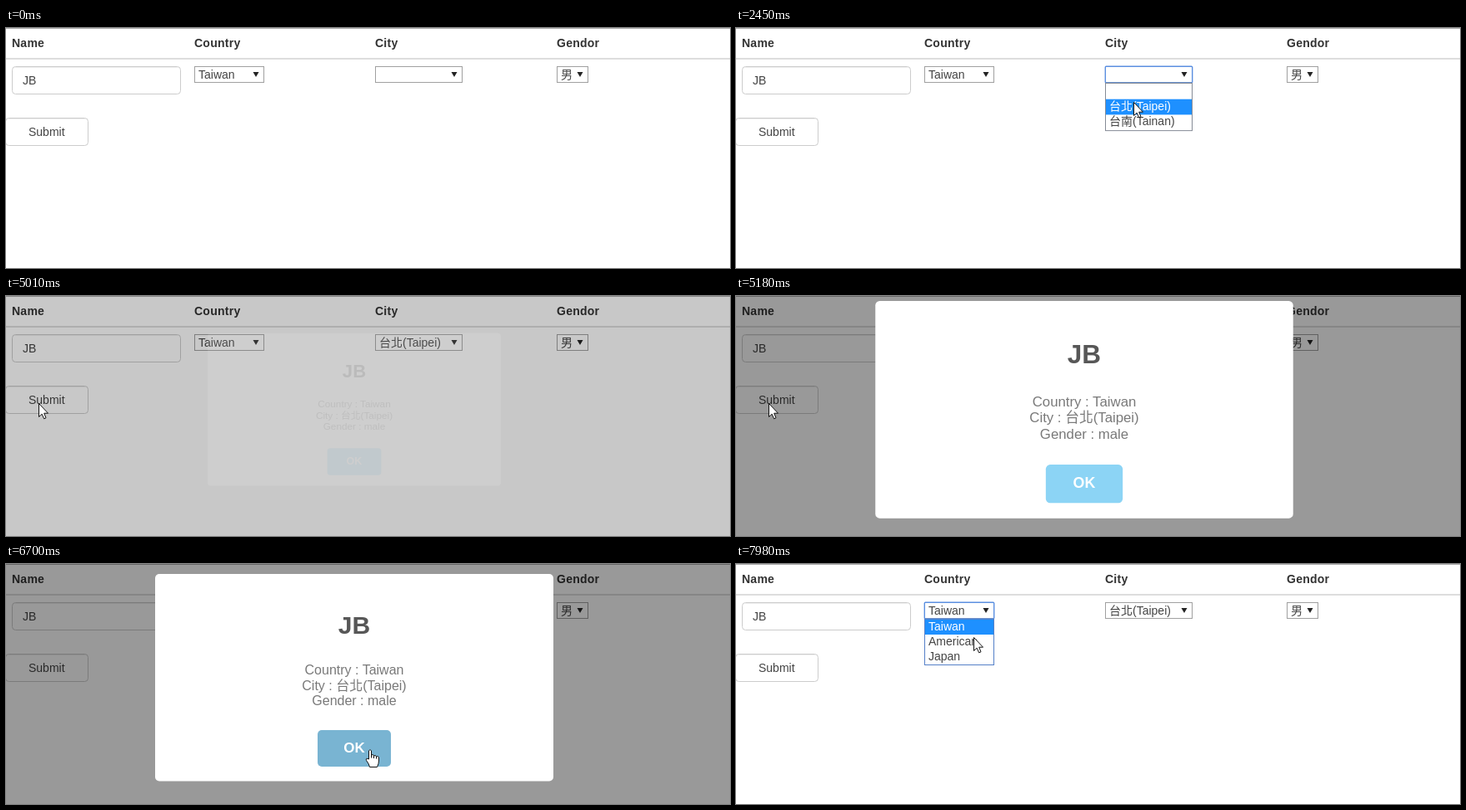
These frames come from a looping animation (869x289 px, 8 s). An HTML page:

```html
<!DOCTYPE html>
<html>
<head>
<meta charset="utf-8">
<style>
html, body { margin: 0; width: 100%; height: 100%; overflow: hidden; background: #fff; }
svg { display: block; width: 869px; height: 289px; }
text { font: 300 14px "Liberation Sans", "Noto Sans CJK TC", "Noto Sans CJK", sans-serif; fill: #444; }
.head text { font-weight: 700; fill: #333; letter-spacing: .25px; }
.field { fill: #fff; stroke: #ccc; }
.select { fill: #fff; stroke: #a0a0a0; }
.focus { fill: none; stroke: #5b8fe0; stroke-width: 1.4; }
.glow { stroke: #66afe9; filter: drop-shadow(0 0 3px rgba(102,175,233,.5)); }
#modal text { text-anchor: middle; font-size: 16px; fill: #797979; }
#modal .title { font-size: 30px; font-weight: 700; fill: #575757; }
#modal .ok { font-size: 17px; font-weight: 700; fill: #fff; }
.cursor { fill: #fff; stroke: #111; stroke-linejoin: round; }
</style>
</head>
<body>
<svg viewBox="0 0 869 289">
  <path d="M0 .5H869" stroke="#aaa"/>
  <path d="M0 37H869" stroke="#ddd" stroke-width="2"/>
  <g class="head">
    <text x="7" y="23">Name</text><text x="226" y="23">Country</text>
    <text x="443" y="23">City</text><text x="661" y="23">Gendor</text>
  </g>
  <rect class="field" x="7.5" y="46.5" width="202" height="33" rx="4"/>
  <text x="20" y="68">JB</text>
  <rect class="field" id="submit" x="-.5" y="108.5" width="99" height="33" rx="4"/>
  <path d="M10 47.5H207M2 109.5H96" stroke="#eee"/>
  <text x="27" y="130">Submit</text>
  <g id="selects"></g>
  <g id="lists"></g>
  <rect id="shade" width="869" height="289"/>
  <g id="modal">
    <rect x="179" y="12" width="478" height="249.5" rx="5" fill="#fff"/>
    <text class="title" x="418" y="84">JB</text>
    <text x="418" y="133">Country : Taiwan</text>
    <text x="418" y="151.5">City : 台北(Taipei)</text>
    <text x="418" y="170">Gender : male</text>
    <rect id="ok" x="374" y="200" width="88" height="44" rx="5"/>
    <text class="ok" x="418" y="227">OK</text>
  </g>
  <g id="cursor">
    <path id="arrow" class="cursor" d="M.5 .5V16.5L4.2 13.2 6.6 18.8 9 17.8 6.7 12.2H11.5Z"/>
    <g id="hand" transform="translate(2 1)">
      <path class="cursor" d="M-1.5 12V2Q0-1 1.5 2V7Q4 5.5 4.5 8 7 6.5 7.5 9 10.5 7.5 10.5 11V14Q10.5 17 8.5 21.5H-.5Q-1 18-4.5 13.5-5.5 10-1.5 12Z"/>
      <path class="cursor" d="M1.5 7V10.5M4.5 8V11M7.5 9V11.5"/>
    </g>
  </g>
</svg>
<script>
const $ = id => document.getElementById(id);
const show = (el, on) => { el.style.display = on ? '' : 'none'; };
const clamp = v => Math.max(0, Math.min(1, v));
const ease = v => v * v * (3 - 2 * v);
const progress = (t, from, to) => clamp((t - from) / (to - from));

function addSelect(id, x, w, label) {
  $('selects').innerHTML += `<rect class="select" x="${x + .5}" y="46.5" width="${w - 1}" height="19"/>
    <text id="${id}" x="${x + 5}" y="61">${label}</text>
    <path d="M${x + w - 13.5} 53h7l-3.5 6z" fill="#222"/>
    <rect class="focus" id="${id}Focus" x="${x + .3}" y="46.3" width="${w - .6}" height="19.6" rx="1"/>`;
}

function addList(id, x, w, row, color, items, picked) {
  const line = (s, i) => `<text x="${x + 5}" y="${80 + i * row}"
    ${i === picked ? 'style="fill:#fff"' : ''}>${s}</text>`;
  $('lists').innerHTML += `<g id="${id}List">
    <rect x="${x + .5}" y="66.5" width="${w - 1}" height="${row * items.length + 1}" fill="#fff" stroke="${color}"/>
    <rect x="${x + 1}" y="${67 + picked * row}" width="${w - 2}" height="${row}" fill="#1e90ff"/>
    ${items.map(line).join('')}</g>`;
}

addSelect('country', 226, 84, 'Taiwan');
addSelect('city', 443, 105, '');
addSelect('gender', 661, 38, '男');
addList('country', 226, 84, 18, '#5580c8', ['Taiwan', 'American', 'Japan'], 0);
addList('city', 443, 105, 18.7, '#858b96', ['', '台北(Taipei)', '台南(Tainan)'], 1);

const spot = {
  below: [610, 262], gender: [694, 55], left: [199, 24], country: [284, 56], city: [466, 62],
  taipei: [477, 89], submit: [39, 129], ok: [435, 222], middle: [390, 155], american: [285, 88]
};
// Each trip: start, end, destination; the pointer rests in between
const trips = [
  [70, 300, 'gender'], [300, 600, 'left'], [600, 770, 'country'], [920, 1690, 'city'],
  [1850, 2450, 'taipei'], [2710, 3160, 'gender'], [3360, 3930, 'submit'], [5260, 5830, 'ok'],
  [6840, 6950, 'middle'], [7050, 7420, 'country'], [7650, 7970, 'american']
];

function pointer(t) {
  let at = spot.below;
  for (const [from, to, name] of trips) {
    const k = ease(progress(t, from, to));
    at = at.map((v, i) => v + (spot[name][i] - v) * k);
  }
  return at.map(Math.round);
}

// The dialog springs in as a damped wave and shrinks away on closing
function dialogScale(t) {
  const u = Math.max(0, t - 5000);
  return 1 - .3 * Math.exp(-u / 100) * Math.cos(Math.PI * u / 180) - .5 * progress(t, 6840, 6940);
}

function draw(t) {
  const within = (a, b) => t >= a && t < b;
  const open = 1 - progress(t, 6840, 6940);

  $('city').textContent = t >= 2710 ? '台北(Taipei)' : '';
  show($('cityFocus'), within(1850, 4930));
  show($('countryFocus'), t >= 7650);
  show($('genderFocus'), false);
  show($('cityList'), within(1850, 2710));
  show($('countryList'), t >= 7720);
  $('submit').classList.toggle('glow', within(6850, 7650));

  $('shade').style.opacity = .4 * progress(t, 4930, 5080) * open;
  $('modal').style.opacity = progress(t, 5000, 5100) * open;
  $('modal').setAttribute('transform', `translate(418 136.5) scale(${dialogScale(t)}) translate(-418 -136.5)`);
  $('ok').style.fill = t >= 6700 ? '#79b4d2' : t >= 5720 ? '#86cceb' : '#8cd4f5';

  const hand = within(3880, 4620) || within(5720, 6840);
  show($('cursor'), t >= 70);
  show($('hand'), hand);
  show($('arrow'), !hand);
  $('cursor').setAttribute('transform', `translate(${pointer(t)})`);
}

function frame() {
  draw(performance.now() % 8000);
  requestAnimationFrame(frame);
}
frame();
</script>
</body>
</html>
```
